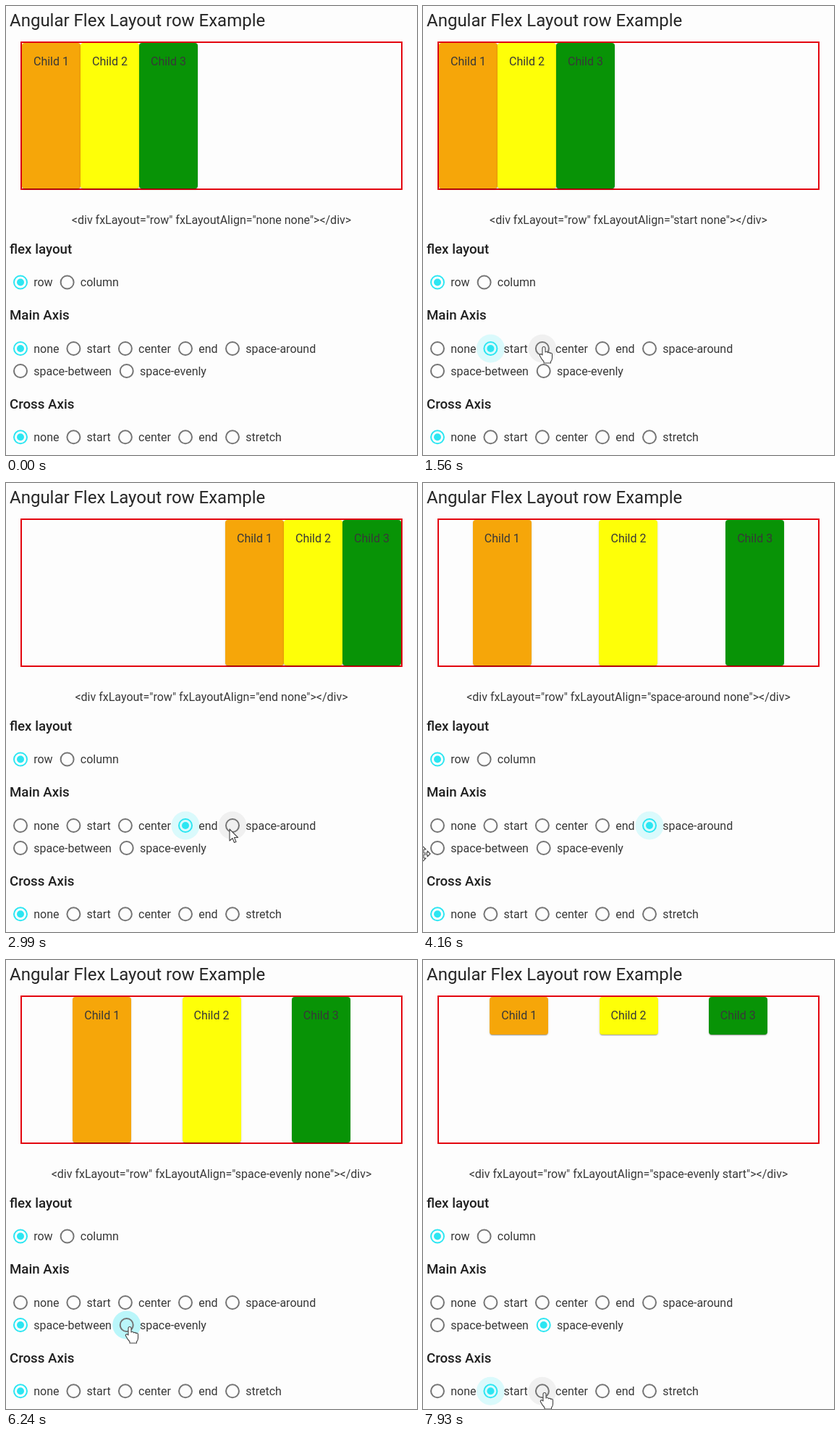
Recreate the animation shown at these times as an HTML page. Size 568 by 620 pixels, loop 8 s.

```html
<!DOCTYPE html>
<html lang="en">
<head>
<meta charset="utf-8">
<title>Flex layout demo</title>
<style>
  html, body { margin: 0; width: 100%; height: 100%; overflow: hidden; background: #fdfdfd; }
  body { font: 16px/20px Roboto, sans-serif; color: #383838; position: relative; }
  svg { position: absolute; left: 0; top: 0; }
  text { fill: #383838; }
  .title { font-size: 24px; fill: #262626; }
  .heading { font-size: 18.72px; font-weight: 500; fill: #1f1f1f; }
  #box {
    position: absolute; left: 20px; top: 49px; width: 524px; height: 201px;
    border: 2px solid #e3060f; display: flex;
  }
  #box div {
    padding: 16px; border-radius: 4px; white-space: nowrap;
    box-shadow: 0 2px 1px -1px #0003, 0 1px 1px #0002, 0 1px 3px #0002;
  }
  .ring { fill: none; stroke: #757575; stroke-width: 2; }
  .dot { fill: #2ce6f2; }
  #cursor { fill: #fff; stroke: #444; stroke-width: 1.1; stroke-linejoin: round; }
</style>
</head>
<body>
<div id="box">
  <div style="background:#f6a609">Child 1</div>
  <div style="background:#feff08">Child 2</div>
  <div style="background:#089306">Child 3</div>
</div>
<svg id="page" width="568" height="620">
  <text class="title" x="5" y="28">Angular Flex Layout row Example</text>
  <text id="code" x="284" y="301" text-anchor="middle"></text>
  <text class="heading" x="5" y="342">flex layout</text>
  <text class="heading" x="5" y="433">Main Axis</text>
  <text class="heading" x="5" y="556">Cross Axis</text>
  <g id="radios"></g>
  <path id="cursor"/>
</svg>
<script>
const LOOP = 8000, STEP = 130;
const byId = id => document.getElementById(id);
const box = byId('box'), code = byId('code'), cursor = byId('cursor');

function add(parent, tag, attrs, text = '') {
  const node = document.createElementNS('http://www.w3.org/2000/svg', tag);
  for (const key in attrs) node.setAttribute(key, attrs[key]);
  node.textContent = text;
  parent.append(node);
  return node;
}

function makeRadio(group, value, x, y) {
  const g = add(byId('radios'), 'g', { transform: `translate(${x} ${y})` });
  const halo = add(g, 'circle', { r: 19.5 });
  const ring = add(g, 'circle', { r: 9, class: 'ring' });
  const dot = add(g, 'circle', { r: 5, class: 'dot' });
  add(g, 'text', { x: 18.2, y: 5.7 }, value);
  return { group, value, x, y, halo, ring, dot };
}

const radios = [
  ['layout', 'row', 20, 381.5], ['layout', 'column', 84.6, 381.5],
  ['main', 'none', 20, 473], ['main', 'start', 93.4, 473], ['main', 'center', 164.9, 473],
  ['main', 'end', 248, 473], ['main', 'space-around', 313, 473],
  ['main', 'space-between', 20, 504], ['main', 'space-evenly', 166.7, 504],
  ['cross', 'none', 20, 595.3], ['cross', 'start', 93.4, 595.3], ['cross', 'center', 164.9, 595.3],
  ['cross', 'end', 248, 595.3], ['cross', 'stretch', 313, 595.3]
].map(args => makeRadio(...args));

const clicks = [
  [1040, 'main', 'start'], [1690, 'main', 'center'], [2470, 'main', 'end'],
  [3250, 'main', 'space-around'], [4550, 'main', 'space-between'],
  [6240, 'main', 'space-evenly'], [7280, 'cross', 'start']
];

const shapes = {
  arrow: 'M0 0V16l4-3.5 2.5 6 2.5-1-2.5-6h5z',
  hand: 'M-2 11V1.5a2 2 0 0 1 4 0V7a2 2 0 0 1 3.5.8a2 2 0 0 1 3.2.8a1.7 1.7 0 0 1 2.8 1.4V15' +
        'q0 3-2 5v2H0V20q-3-3-5.5-8a1.6 1.6 0 0 1 2.6-1.8z',
  move: 'M0-10l4 4h-3v5h5v-3l4 4-4 4v-3h-5v5h3l-4 4-4-4h3v-5h-5v3l-4-4 4-4v3h5v-5h-3z'
};

// time, x, y, shape used from that time on
const path = [
  [0, 110, 650, 'arrow'], [260, 110, 640, 'arrow'], [910, 96, 474, 'hand'],
  [1170, 96, 474, 'hand'], [1560, 167, 471, 'hand'], [1950, 168, 472, 'hand'],
  [2340, 249, 474, 'hand'], [2600, 250, 475, 'arrow'], [2990, 309, 478, 'arrow'],
  [3250, 313, 476, 'hand'], [3510, 313, 476, 'arrow'], [4030, 4, 512, 'move'],
  [4160, 0, 512, 'move'], [4420, 19, 506, 'hand'], [4680, 20, 506, 'hand'],
  [5070, 130, 510, 'hand'], [5330, 135, 511, 'hand'], [5850, 171, 507, 'hand'],
  [6370, 171, 507, 'arrow'], [7020, 95, 597, 'hand'], [7410, 95, 597, 'hand'],
  [7930, 168, 598, 'hand'], [LOOP, 168, 598, 'hand']
];

function pointerAt(t) {
  const i = path.findIndex((key, n) => t >= key[0] && t < path[n + 1][0]);
  const [t0, x0, y0, shape] = path[i], [t1, x1, y1] = path[i + 1];
  const p = (t - t0) / (t1 - t0), ease = p * p * (3 - 2 * p);
  return { x: x0 + (x1 - x0) * ease, y: y0 + (y1 - y0) * ease, shape };
}

function stateAt(t) {
  const state = { layout: 'row', main: 'none', cross: 'none' };
  for (const [time, group, value] of clicks) if (t >= time) state[group] = value;
  return state;
}

function draw(t) {
  const layout = stateAt(t), checked = stateAt(t - STEP);
  const focus = clicks.filter(click => t >= click[0]).pop();
  const pointer = pointerAt(t);

  box.style.justifyContent = layout.main === 'none' ? 'flex-start' : layout.main;
  box.style.alignItems = layout.cross === 'none' ? 'stretch' : layout.cross;
  code.textContent = `<div fxLayout="${layout.layout}" fxLayoutAlign="${layout.main} ${layout.cross}"></div>`;

  for (const r of radios) {
    const on = checked[r.group] === r.value;
    const focused = focus && focus[1] === r.group && focus[2] === r.value;
    const hovered = Math.hypot(pointer.x - r.x, pointer.y - r.y) < 15;
    r.ring.style.stroke = on ? '#2ce6f2' : '';
    r.dot.style.display = on ? '' : 'none';
    r.halo.style.fill = focused ? '#2ce6f2' : '#000';
    r.halo.style.opacity = focused ? (t - focus[0] < STEP ? .32 : .17) : hovered ? .05 : 0;
  }

  cursor.setAttribute('d', shapes[pointer.shape]);
  cursor.setAttribute('transform', `translate(${pointer.x} ${pointer.y})`);
}

const start = performance.now();
function frame() {
  const t = (performance.now() - start) % LOOP;
  draw(Math.floor(t / STEP) * STEP);
  requestAnimationFrame(frame);
}
frame();
</script>
</body>
</html>
```
